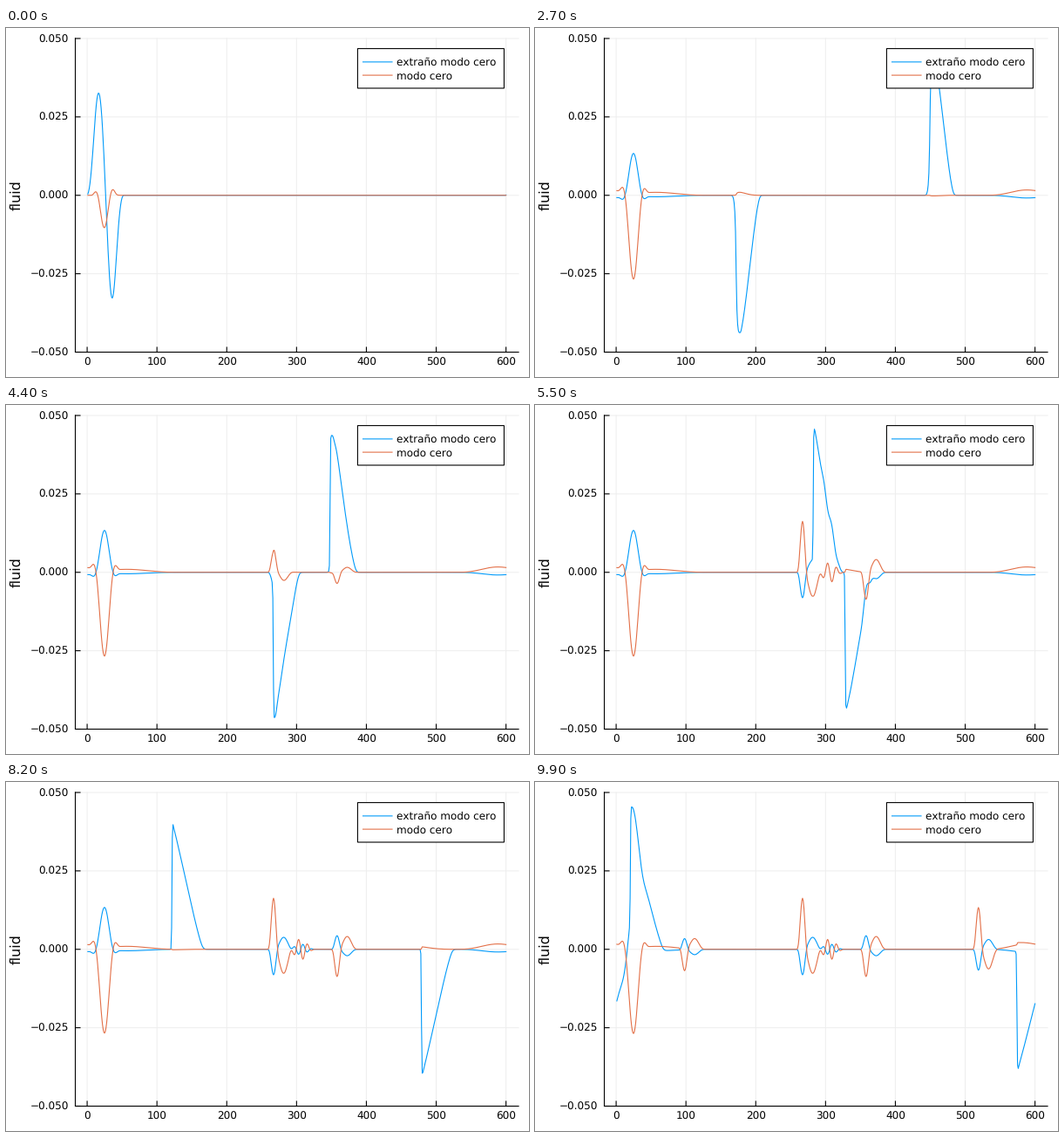
These frames come from a looping animation (600x400 px, 10 s). A matplotlib script:

```python
import numpy as np
import matplotlib.pyplot as plt
from matplotlib.animation import FuncAnimation
from matplotlib.patches import Rectangle

W, H, DPI = 600, 400, 100
PT = 72 / DPI                      # points per pixel
FRAMES, INTERVAL = 100, 100
LEFT, RIGHT, TOP, BOTTOM = 79.5, 588, 12, 371.5
BLUE, RED = "#009afa", "#e36f47"

SOUND = 10 / np.sqrt(3)            # cells per frame
STEEPEN = 8.7
HEIGHT, HALF = 0.0442, 22
CENTER, OFFSET = 25.8, 5.3
DX, DT = .5, .25

plt.rcParams.update({"font.family": "DejaVu Sans", "path.snap": False,
                     "text.hinting": "none", "text.hinting_factor": 1})
x = np.arange(1, 601)
near = np.where(x < 300, x, x - 600)
grid = np.arange(-70, 50, DX)


def bump(s, half, power=4):
    return np.clip(1 - (s / half) ** 2, 0, None) ** power


def settle(age):
    return 1 - np.exp(-.5 * (age + 1)) if age >= 0 else 0


def rate(q):
    """Burgers flux difference with minmod slopes."""
    d = np.diff(q, prepend=0, append=0)
    a, b = d[:-1], d[1:]
    slope = np.where(a * b > 0, np.sign(a) * np.minimum(abs(a), abs(b)), 0)
    ql, qr = (q + slope / 2)[:-1], (q - slope / 2)[1:]
    flux = -STEEPEN * (ql ** 2 + qr ** 2) / 4 - .2 * (qr - ql)
    return -np.diff(flux, prepend=0, append=0) / DX


def pulse_history():
    """Pulse shape per frame, in coordinates that travel with it."""
    q, rows = HEIGHT * bump(grid, HALF, 3), []
    for _ in range(FRAMES):
        rows.append(q)
        for _ in range(round(1 / DT)):
            mid = q + DT * rate(q)
            q = (q + mid + DT * rate(mid)) / 2
    return rows


history = pulse_history()


def pulse(n, center):
    s = (x - center + 300) % 600 - 300
    return np.interp(s, grid, history[n], left=0, right=0)


def core(n):
    w = settle(n)
    s = near - 24.8
    hat = 1 - (s / (7.2 + 5.8 * w)) ** 2
    return -.0275 * w * hat * bump(s, 18 + 6 * w)


def tails(back, front):
    """Broad rises uncovered as the two pulses move apart."""
    shown = np.clip((near - back) / 20, 0, 1) * np.clip((front - near) / 20, 0, 1)
    return shown * (.00095 * bump(near - 57, 80) + .0017 * bump(near + 12, 62))


def echo(s):
    return bump(s, 9) - .47 * bump(s - 14.5, 16)


def ripple(s):
    return -.0034 * np.sin(2 * np.pi * s / 13) * bump(s, 24)


def standing(n, back, front):
    z = core(n) + tails(back, front)
    for start, dip, peak, gain in ((44, 267, 358, 1), (88, 519, 98, .82)):
        w = gain * settle(n - start)
        z += w * (.0163 * echo(x - dip) - .0087 * echo(x - peak))
    return z + settle(n - 50) * ripple(x - 306)


def fields(n):
    back = CENTER - OFFSET - SOUND * n
    front = CENTER + OFFSET + SOUND * n
    up, down = pulse(n, back), pulse(n, front)
    z = standing(n, back, front)
    blue = up - down - z / 2 * (1 - 8 * up)
    red = z + .5 * down ** 2 - .1 * up ** 2
    return blue, red


def px(v):
    return LEFT + (v + 16.97) / 634.94 * (RIGHT - LEFT)


def py(v):
    return (TOP + BOTTOM) / 2 - v * (BOTTOM - TOP) / .1


fig = plt.figure(figsize=(W / DPI, H / DPI), dpi=DPI, facecolor="white")
ax = fig.add_axes([0, 0, 1, 1])
ax.set_xlim(0, W)
ax.set_ylim(H, 0)
ax.axis("off")


def line(xs, ys, color="black", width=1.1, z=2):
    return ax.plot(xs, ys, color=color, lw=width * PT, zorder=z)[0]


def label(tx, ty, text, size=11.9, **kw):
    ax.text(tx, ty, text, fontsize=size * PT, va="baseline", zorder=6, **kw)


for v in range(0, 601, 100):
    line([px(v)] * 2, [TOP, BOTTOM], "#eeeeee", 1, 1)
    line([px(v)] * 2, [BOTTOM, BOTTOM - 5.5])
    label(px(v), 387, str(v), ha="center")
for v in np.linspace(-.05, .05, 5):
    line([LEFT, RIGHT], [py(v)] * 2, "#eeeeee", 1, 1)
    line([LEFT, LEFT + 5.5], [py(v)] * 2)
    label(71.7, py(v) + 4.4, f"{v:.3f}".replace("-", "\u2212"), ha="right")
line([LEFT, LEFT, RIGHT], [TOP, BOTTOM, BOTTOM])
label(16, py(0), "fluid", 16.4, ha="center", rotation=90,
      rotation_mode="anchor")

ax.add_patch(Rectangle((403.4, 23.6), 168, 45.4, fc="white", ec="black",
                       lw=1.1 * PT, zorder=5))
for ly, color, text in ((38.9, BLUE, "extraño modo cero"),
                        (54.1, RED, "modo cero")):
    line([409.5, 443], [ly, ly], color, 1.1, 6)
    label(447.8, ly + 4.4, text)

curves = [line(px(x), py(0 * x), color, 1.1, z)
          for color, z in ((BLUE, 3), (RED, 4))]


def update(n):
    for curve, values in zip(curves, fields(n)):
        curve.set_ydata(py(values))
    return curves


anim = FuncAnimation(fig, update, frames=FRAMES, interval=INTERVAL,
                     repeat=True, repeat_delay=0, blit=False)
plt.show()
```
